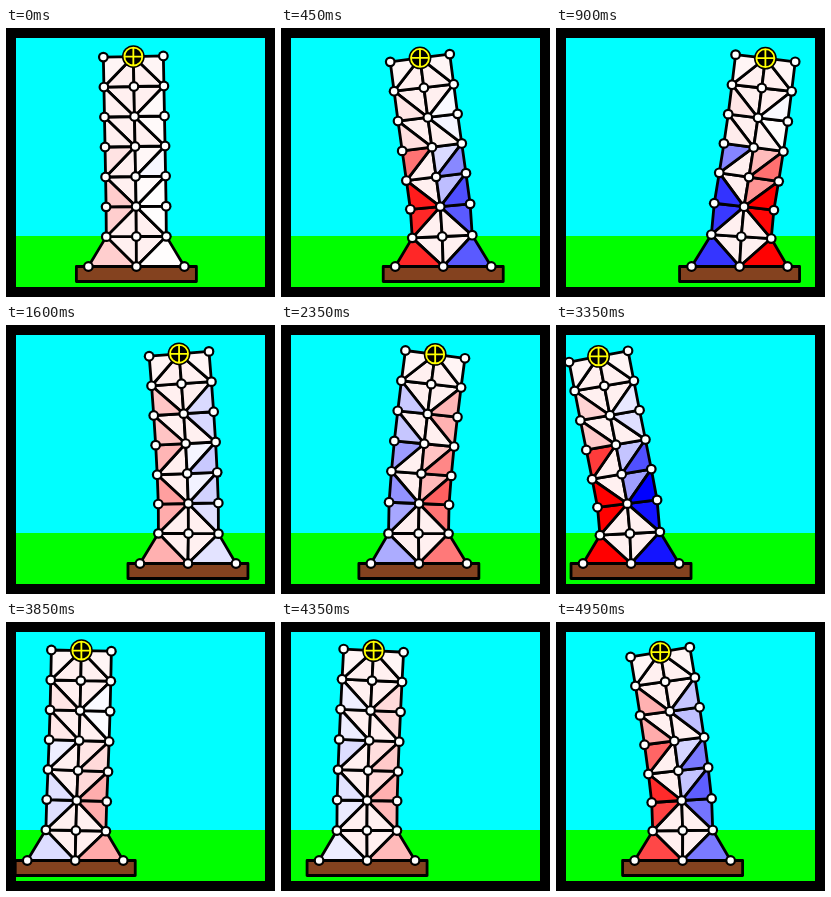
Write an HTML page with a canvas that moves like this. It is 269 px wide and 269 px high and loops after 5 s.

```html
<!DOCTYPE html>
<html lang="en">
<head>
<meta charset="utf-8">
<title>Swaying truss tower</title>
<style>
  html, body { margin: 0; width: 100%; height: 100%; overflow: hidden; background: #000; }
  canvas { display: block; width: 269px; height: 269px; }
</style>
</head>
<body>
<canvas id="stage" width="269" height="269"></canvas>
<script>
const ctx = document.getElementById('stage').getContext('2d');
const LOOP = 5000, STEP = 50;
const ROWS = 7, PANEL = 30, GROUND = 238;

// Sideways shape of the main sway, base to top
const SWAY = [0, 0.04, 0.125, 0.3, 0.48, 0.66, 0.83, 1];
// Panel strain per pixel of sway and of bulge, base to top
const BEND = [0.032, 0.032, 0.034, 0.022, 0.004, 0.003, 0];
const BULGE = [-0.03, -0.02, 0, 0.04, 0.09, 0.09, 0];
// Share of the strain that reaches the inner triangles
const INNER = [0, 0, 0.4, 0.4, 0, 0, 0];
// Brace per row, base to top: V runs from the side down to the middle, A the other way
const BRACE = { left: 'VAVAVVA', right: 'VAVVAVA' };

function motion(t) {
  const s = t / 1000 + 0.025;
  const drive = Math.sin(2 * Math.PI * s / 5);
  return {
    base: 128 + 60 * drive,
    sway: 7.2 * drive - 30.7 * Math.exp(-0.05 * s) * Math.sin(4.2 * s),
    bulge: 1.5 * drive - 2.5 * Math.min(1, s) * Math.cos(22.8 * (s - 2.375))
  };
}

function buildNodes({ base, sway, bulge }) {
  const off = SWAY.map((k, i) => {
    const h = i / ROWS;
    return k * sway + bulge * (Math.sin(Math.PI * h) - 0.4 * h ** 3);
  });
  let y = GROUND;
  return off.map((dx, i) => {
    if (i === 0) return [-48, 0, 48].map(x => [base + x, y]);
    const rise = dx - off[i - 1];
    y -= Math.sqrt(PANEL * PANEL - rise * rise);
    const slope = i === ROWS ? rise / PANEL : 0.9 * (off[i + 1] - off[i - 1]) / (2 * PANEL);
    const tilt = Math.atan(slope);
    return [-30, 0, 30].map(x => [base + dx + x * Math.cos(tilt), y + x * Math.sin(tilt)]);
  });
}

// Red for squeezed, blue for stretched
function strainColor(v) {
  const pale = Math.round(255 * (1 - Math.min(1, Math.abs(v))));
  return v > 0 ? `rgb(255,${pale},${pale})` : `rgb(${pale},${pale},255)`;
}

function polygon(points, fill) {
  ctx.beginPath();
  points.forEach(p => ctx.lineTo(p[0], p[1]));
  ctx.closePath();
  ctx.fillStyle = fill;
  ctx.fill();
  ctx.stroke();
}

function disc(x, y, r, fill) {
  ctx.beginPath();
  ctx.arc(x, y, r, 0, 2 * Math.PI);
  ctx.fillStyle = fill;
  ctx.fill();
}

function drawPanels(nodes, { sway, bulge }) {
  for (let r = 0; r < ROWS; r++) {
    const low = nodes[r], high = nodes[r + 1];
    for (const side of [-1, 1]) {
      const e = 1 + side;
      const brace = (side < 0 ? BRACE.left : BRACE.right)[r];
      const v = side * (sway * BEND[r] - bulge * BULGE[r]);
      const outer = strainColor(v + (BEND[r] > 0.03 ? 0.1 : 0.04));
      const inner = strainColor((side > 0 ? v * INNER[r] : 0) + 0.06);
      if (brace === 'V') {
        polygon([high[1], high[e], low[1]], inner);
        polygon([high[e], low[e], low[1]], outer);
      } else {
        polygon([high[1], low[1], low[e]], inner);
        polygon([high[1], high[e], low[e]], outer);
      }
    }
  }
}

function drawMarker([x, y]) {
  disc(x, y, 11.4, '#000');
  ctx.strokeStyle = '#ff0';
  ctx.lineWidth = 1.8;
  ctx.beginPath();
  ctx.arc(x, y, 9, 0, 2 * Math.PI);
  ctx.moveTo(x - 9, y);
  ctx.lineTo(x + 9, y);
  ctx.moveTo(x, y - 9);
  ctx.lineTo(x, y + 9);
  ctx.stroke();
}

function draw(t) {
  const m = motion(t);
  const nodes = buildNodes(m);

  ctx.fillStyle = '#0ff';
  ctx.fillRect(0, 0, 269, 208);
  ctx.fillStyle = '#0f0';
  ctx.fillRect(0, 208, 269, 61);

  ctx.save();
  ctx.translate(0.5, 0.5);
  ctx.lineJoin = 'round';
  ctx.strokeStyle = '#000';
  ctx.lineWidth = 2.8;
  ctx.fillStyle = '#84421f';
  ctx.fillRect(m.base - 60, GROUND, 120, 15);
  ctx.strokeRect(m.base - 60, GROUND, 120, 15);

  drawPanels(nodes, m);
  nodes.flat().forEach(([x, y]) => {
    disc(x, y, 5.4, '#000');
    disc(x, y, 3.2, '#fff');
  });
  drawMarker(nodes[ROWS][1]);
  ctx.restore();

  ctx.strokeStyle = '#000';
  ctx.lineWidth = 10;
  ctx.strokeRect(5, 5, 259, 259);
}

const start = performance.now();
function tick() {
  const t = (performance.now() - start) % LOOP;
  draw(Math.floor(t / STEP) * STEP);
  requestAnimationFrame(tick);
}
tick();
</script>
</body>
</html>
```
